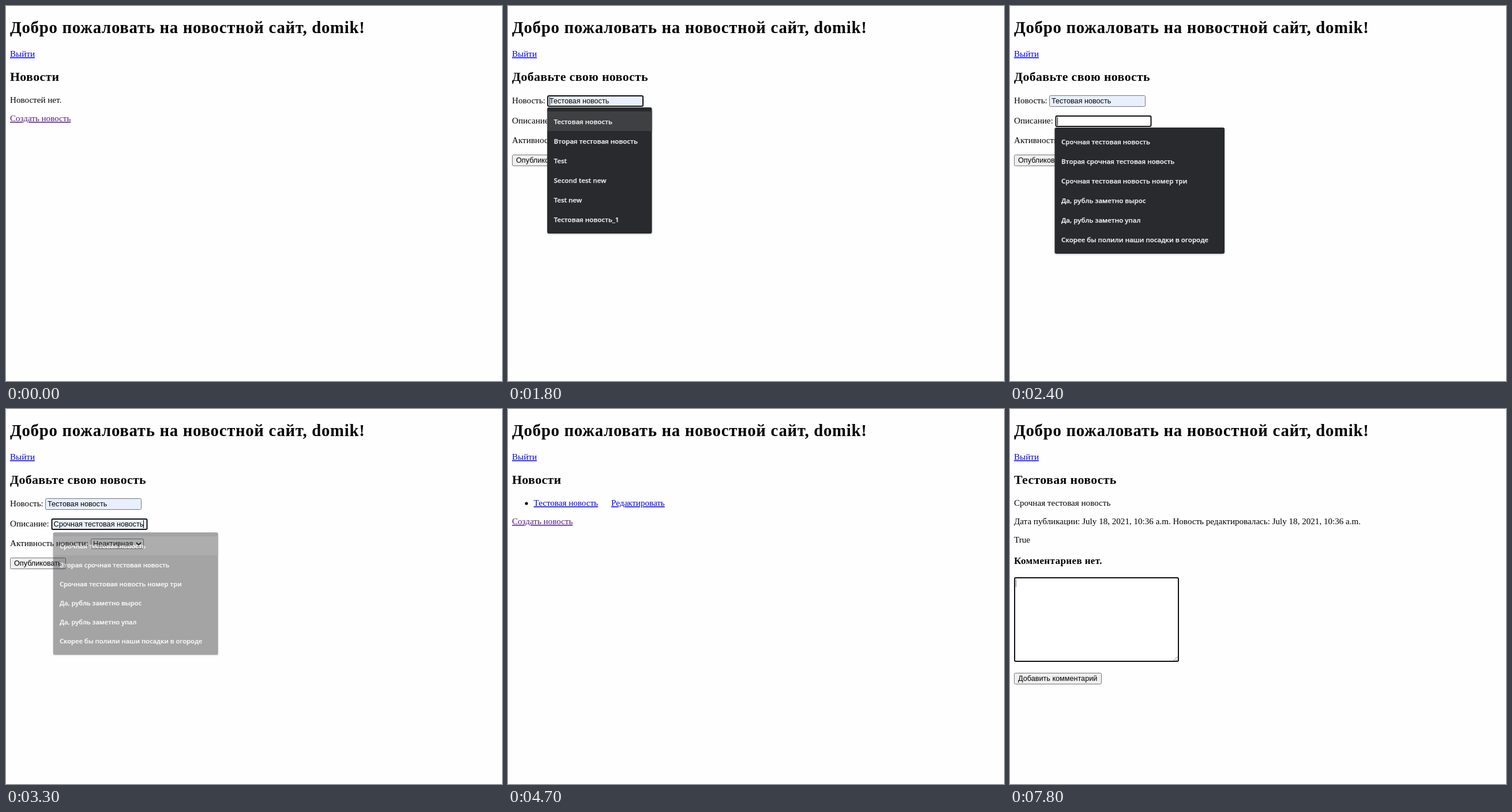
These frames come from a looping animation (860x651 px, 8 s). An HTML page:

```html
<!DOCTYPE html>
<html lang="ru">
<head>
<meta charset="utf-8">
<style>
html, body { margin: 0; width: 100%; height: 100%; overflow: hidden; background: #fefefe; }
svg { display: block; width: 860px; height: 651px; }
text { white-space: pre; font: 15.1px "Liberation Serif", serif; }
.h1 { font-size: 28.8px; font-weight: bold; letter-spacing: .7px; }
.h2 { font-size: 21.8px; font-weight: bold; letter-spacing: .4px; }
.h3 { font-size: 17px; font-weight: bold; letter-spacing: .4px; }
.ui { font: 12.65px "Liberation Sans", sans-serif; }
.item { font: 600 11.55px "Open Sans", "Noto Sans", sans-serif; fill: #eceef1; stroke: #eceef1; stroke-width: .25px; }
.link { text-decoration: underline; }
.shadow { filter: drop-shadow(0 1px 1.5px #0004); }
</style>
</head>
<body>
<svg id="stage" viewBox="0 0 860 651"></svg>
<script>
const LOOP = 8000;
const BLUE = '#00e', VISITED = '#551a8b', ACTIVE = '#f00';
const GRAY = '#767676', DARK = '#4f4f4f', FILLED = '#e8f0fe';
const TITLE = 'Тестовая новость', BODY = 'Срочная тестовая новость';
const TITLES = [TITLE, 'Вторая тестовая новость', 'Test', 'Second test new', 'Test new', 'Тестовая новость_1'];
const BODIES = [BODY, 'Вторая срочная тестовая новость', 'Срочная тестовая новость номер три',
  'Да, рубль заметно вырос', 'Да, рубль заметно упал', 'Скорее бы полили наши посадки в огороде'];

const text = (s, x, y, cls = '', fill = '#000') =>
  `<text x="${x}" y="${y}" class="${cls}" fill="${fill}">${s}</text>`;
const link = (s, x, y, color) => text(s, x, y, 'link', color);
const rect = (x, y, w, h, fill, r = 0) =>
  `<rect x="${x}" y="${y}" width="${w}" height="${h}" rx="${r}" fill="${fill}"/>`;

// Outer size stays the same for every border width
const box = (x, y, w, h, fill, stroke = GRAY, line = 1) =>
  `<rect x="${x + line / 2}" y="${y + line / 2}" width="${w - line}" height="${h - line}" rx="2"
    fill="${fill}" stroke="${stroke}" stroke-width="${line}"/>`;
const caret = (x, y, color = '#000') => rect(x, y, 1, 14, color);

const field = (x, y, { value = '', filled, hover, focus }) =>
  box(x, y, 167, 20, filled ? FILLED : '#fff', focus ? '#101010' : hover ? DARK : GRAY, focus ? 2 : 1) +
  text(value, x + 4, y + 14, 'ui');

function button(s, x, y, w, mode) {
  const [fill, stroke] = { hover: ['#e5e5e5', DARK], press: ['#f5f5f5', '#8d8d8d'] }[mode] || ['#efefef', GRAY];
  return box(x, y, w, 20, fill, stroke) + text(s, x + 7, y + 14, 'ui');
}

// fade runs from 0 (open) to 1 (gone)
function popup(x, y, w, items, hover, fade = 0) {
  const cx = x + w / 2, cy = y + 109.5, k = 1 - fade * .05;
  return `<g class="shadow" opacity="${1 - fade}"
    transform="translate(${cx} ${cy}) scale(${k}) translate(${-cx} ${-cy})">` +
    rect(x, y, w, 219, '#292a2d', 3) +
    (hover ? rect(x, y + 7, w, 34, '#3f4042') : '') +
    items.map((s, i) => text(s, x + 11.5, y + 29 + i * 34, 'item')).join('') + '</g>';
}

function optionList(row) {
  const names = ['Неактивная', 'Активная'];
  return `<g class="shadow">${rect(147, 243, 92, 34, GRAY)}${rect(148, 244, 90, 32, '#fff')}</g>` +
    rect(148, 244 + row * 16, 90, 16, '#1967d2') +
    names.map((s, i) => text(s, 151, 256 + i * 16, 'ui', i === row ? '#fff' : '#000')).join('');
}

const newsPage = (items, createColor) =>
  text('Новости', 7, 130, 'h2') + items + link('Создать новость', 7, 200, createColor);

function formPage(t) {
  const on = (a, b) => t >= a && t < b;
  const titleFocus = on(1600, 2400), bodyFocus = on(2400, 3600);
  let s = text('Добавьте свою новость', 7, 130, 'h2') +
    text('Новость:', 7, 169) + text('Описание:', 7, 204) + text('Активность новости:', 7, 238) +
    field(68, 155, { value: t >= 1800 ? TITLE : '', filled: t >= 1800, hover: on(1400, 1600), focus: titleFocus }) +
    field(78.5, 190, { value: t >= 2700 ? BODY : '', filled: t >= 2700, hover: on(1000, 1200), focus: bodyFocus }) +
    box(147, 225, 92, 18, '#fff', on(3600, 4100) ? DARK : GRAY) +
    text(t < 4000 ? 'Неактивная' : 'Активная', 151, 238, 'ui') +
    '<path d="M226 232l4 4 4-4" fill="none" stroke="#000" stroke-width="1.8"/>' +
    button('Опубликовать', 7, 258, 97, t < 4100 ? '' : on(4500, 4600) ? 'press' : 'hover');
  if (titleFocus) s += caret(t < 2100 ? 72 : 175, 158);
  if (on(2400, 2900)) s += caret(82, 193);
  if (on(3200, 3600)) s += caret(238, 193);
  if (on(1600, 2200)) s += popup(68, 176, 181.5, TITLES, t >= 1800, t < 2100 ? 0 : .58);
  if (on(2400, 3400)) s += popup(77.5, 211, 294.5, BODIES, t >= 2700, t < 3200 ? 0 : t < 3300 ? .15 : .58);
  if (on(3600, 4000)) s += optionList(t < 3800 ? 0 : 1);
  return s;
}

function articlePage(t) {
  const focus = t >= 7200;
  return text(TITLE, 7, 130, 'h2') + text(BODY, 7, 168) +
    text('Дата публикации: July 18, 2021, 10:36 a.m. Новость редактировалась: July 18, 2021, 10:36 a.m.', 7, 200) +
    text('True', 7, 232) + text('Комментариев нет.', 7, 269, 'h3') +
    box(7, 292, 286, 147, '#fff', focus ? '#101010' : GRAY, focus ? 2 : 1) +
    '<path d="M283.5 437l7-7M287.5 437l3-3" stroke="#777"/>' +
    (focus ? caret(10, 295, t < 7800 ? '#000' : '#777') : '') +
    button('Добавить комментарий', 7, 458, 152);
}

function page(t) {
  if (t < 700) return newsPage(text('Новостей нет.', 7, 168), t >= 500 && t < 600 ? ACTIVE : VISITED);
  if (t < 4700) return formPage(t);
  if (t >= 6700) return articlePage(t);
  return newsPage('<circle cx="32" cy="164" r="2.6"/>' +
    link(TITLE, 44.5, 168, t >= 6500 && t < 6600 ? ACTIVE : BLUE) +
    link('Редактировать', 179, 168, BLUE), VISITED);
}

const stage = document.getElementById('stage');
const start = performance.now();
let shown = '';
function draw() {
  const t = (performance.now() - start) % LOOP;
  const next = text('Добро пожаловать на новостной сайт, domik!', 7, 47, 'h1') + link('Выйти', 7, 88, BLUE) + page(t);
  if (next !== shown) stage.innerHTML = shown = next;
  requestAnimationFrame(draw);
}
draw();
</script>
</body>
</html>
```
